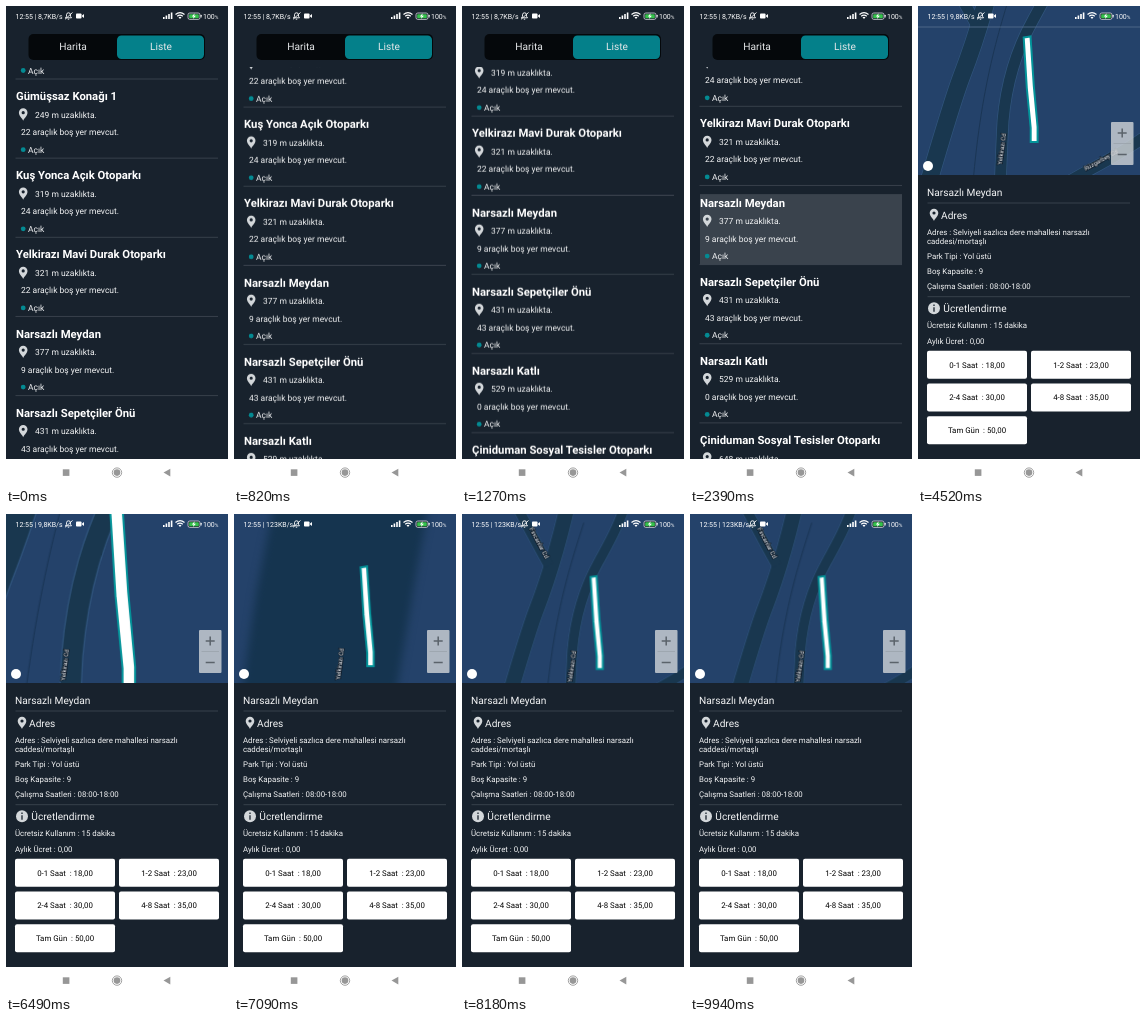
Write an HTML page that moves like this. It is 222 px wide and 480 px high and loops after 10 s.

```html
<!DOCTYPE html>
<html lang="tr">
<head>
<meta charset="utf-8">
<style>
html, body { margin: 0; width: 100%; height: 100%; overflow: hidden; background: #18222d; }
svg { display: block; width: 222px; height: 480px; font-family: Roboto, sans-serif; }
text { white-space: pre; text-rendering: geometricPrecision; }
.anim { animation: 10s linear infinite; }
#rows { animation-name: scroll; }
#list { animation-name: leave; }
#detail { animation-name: enter; }
#press { animation-name: press; }
#coarse { animation-name: coarse; filter: blur(4px); }
#camera { animation-name: camera; }
#roads { animation-name: roads; }
#seam { animation-name: seam; }
#lot { animation-name: lot; }
#labelA { animation-name: labelA; }
#labelB { animation-name: labelB; }
#labelC { animation-name: labelC; }
.net { animation-timing-function: step-end; opacity: 0; }
#net1 { animation-name: net1; }
#net2 { animation-name: net2; }
#net3 { animation-name: net3; }

@keyframes scroll {
  0%, .3% { transform: translateY(0); animation-timing-function: cubic-bezier(.25, .5, .4, 1); }
  4.9%, 8% { transform: translateY(-50px); }
  8.2% { transform: translateY(-51px); animation-timing-function: cubic-bezier(.25, .4, .35, 1); }
  16.1%, 100% { transform: translateY(-131px); }
}
@keyframes press {
  0%, 21.3% { opacity: 0; }
  23.6%, 27% { opacity: 1; }
  29.5%, 100% { opacity: 0; }
}
@keyframes leave {
  0%, 29% { opacity: 1; transform: none; animation-timing-function: ease-in; }
  31.3%, 100% { opacity: 0; transform: translateX(-30px); }
}
@keyframes enter { 0%, 31.5% { opacity: 0; } 33.3%, 100% { opacity: 1; } }
@keyframes net1 { 0% { opacity: 1; } 33% { opacity: 0; } }
@keyframes net2 { 0% { opacity: 0; } 33% { opacity: 1; } 67% { opacity: 0; } }
@keyframes net3 { 0% { opacity: 0; } 67%, 100% { opacity: 1; } }
@keyframes coarse {
  0%, 68% { opacity: 0; }
  70%, 72.5% { opacity: 1; }
  75%, 100% { opacity: 0; }
}
@keyframes roads {
  0%, 35% { opacity: 0; }
  40%, 68% { opacity: 1; }
  70%, 72.5% { opacity: 0; }
  75%, 100% { opacity: 1; }
}
@keyframes camera {
  0%, 45.2% { transform: translate(113px, 83px) scale(1); animation-timing-function: ease-in; }
  51% { transform: translate(114px, 81px) scale(1.55); animation-timing-function: ease-out; }
  57.3% { transform: translate(115.5px, 80px) scale(1.8); }
  63% { transform: translate(116px, 82px) scale(1.9); }
  66.5% { transform: translate(118px, 85px) scale(1.75); }
  70.9% { transform: translate(133.5px, 102px) scale(.945); animation-timing-function: ease-out; }
  76%, 100% { transform: translate(135px, 108.3px) scale(.88); }
}
@keyframes seam { 0%, 40% { opacity: 0; } 42%, 46% { opacity: 1; } 50%, 100% { opacity: 0; } }
@keyframes lot { 0%, 37% { opacity: 0; } 38.5%, 100% { opacity: 1; } }
@keyframes labelA {
  0%, 42.4% { opacity: 0; transform: translate(84px, 143px) rotate(-82deg); }
  43.6%, 45.2% { opacity: 1; transform: translate(84px, 143px) rotate(-82deg); }
  57.3%, 66% { opacity: 1; transform: translate(59px, 151px) rotate(-83deg); }
  70.9% { opacity: 1; transform: translate(106px, 150px) rotate(-83deg); }
  76%, 100% { opacity: 1; transform: translate(110px, 152.5px) rotate(-82deg); }
}
@keyframes labelB {
  0%, 42.4% { opacity: 0; transform: translate(183px, 154px) rotate(-29deg); }
  43.6%, 45.2% { opacity: 1; transform: translate(183px, 154px) rotate(-29deg); }
  49%, 100% { opacity: 0; transform: translate(216px, 183px) rotate(-29deg); }
}
@keyframes labelC { 0%, 74.5% { opacity: 0; } 76%, 100% { opacity: 1; } }
</style>
</head>
<body>
<svg viewBox="0 0 222 480">
  <defs>
    <clipPath id="listClip"><rect y="61" width="222" height="392"/></clipPath>
    <clipPath id="mapClip"><rect width="222" height="169"/></clipPath>
    <path id="pin" fill-rule="evenodd" d="M0 6C-1 3.5-4.3 1-4.3-2A4.3 4.3 0 0 1 4.3-2C4.3 1 1 3.5 0 6ZM-1.6-2a1.6 1.6 0 1 0 3.2 0a1.6 1.6 0 1 0-3.2 0Z"/>
    <path id="avenue" fill="none" d="M86-80C76-30 64 18 43 72C32 102 22 136 -2 220"/>
    <g id="streets" fill="none">
      <path d="M152-70C138-26 128-10 115 14C96 48 88 80 85 115C83 150 82 190 80 240"/>
      <path d="M5-80C26-42 42-10 58 18"/>
      <path d="M110 205C140 178 170 166 200 148S240 122 270 95"/>
    </g>
  </defs>
  <rect width="222" height="480" fill="#18222d"/>

  <g id="list" class="anim">
    <g clip-path="url(#listClip)"><g id="rows" class="anim"></g></g>
    <rect x="22.5" y="28" width="176.5" height="26" rx="5" fill="#05080b"/>
    <rect x="111" y="29.5" width="87" height="23.5" rx="4.5" fill="#04808a"/>
    <g id="tabs"></g>
  </g>

  <g id="detail" class="anim">
    <g clip-path="url(#mapClip)">
      <rect width="222" height="170" fill="#24426a"/>
      <path id="coarse" class="anim" d="M42-20H197L182 60L160 190H6L22 80Z" fill="#15344f"/>
      <g id="camera" class="anim">
        <g transform="translate(-113 -83)">
          <g id="roads" class="anim">
            <path d="M98-30C82 20 62 80 54 190" fill="none" stroke="#1b3655" vector-effect="non-scaling-stroke"/>
            <g stroke="#30547c">
              <use href="#avenue" stroke-width="18.500"/>
              <use href="#streets" stroke-width="12.500"/>
            </g>
            <g stroke="#19374f">
              <use href="#avenue" stroke-width="17"/>
              <use href="#streets" stroke-width="11"/>
            </g>
          </g>
          <path id="seam" class="anim" d="M-10 21H240" stroke="#587190" stroke-width=".8"/>
          <path id="lot" class="anim" d="M105.700 31.500L112.500 30.500L115.800 80L119.600 121V136H112.700V122L108.800 82Z" fill="#fff" stroke="#04949a" stroke-width="2" vector-effect="non-scaling-stroke"/>
        </g>
      </g>
      <g id="labelA" class="anim"></g>
      <g id="labelB" class="anim"></g>
      <g id="labelC" class="anim"></g>
      <circle cx="10" cy="160" r="5" fill="#fff"/>
      <rect x="193" y="116" width="22.5" height="43" rx="1" fill="#d5d9dc" opacity=".78"/>
      <path d="M195.500 137.500H213" stroke="#98a1a9" stroke-width=".7"/>
      <path d="M199.700 127H208.700M204.200 122.500V131.500M199.700 148.500H208.700" stroke="#5b636b" stroke-width="1.5"/>
    </g>
    <g id="info"></g>
  </g>

  <g id="status" fill="#fff">
    <g stroke="#fff" fill="none" stroke-width=".9">
      <path d="M59.500 11.800H65.500L64.500 10.300V8.800A2 2 0 0 0 60.500 8.800V10.300ZM61.800 13.200H63.200M59 13.300L66.500 6.500"/>
      <path d="M169.500 8.500Q174 4.700 178.500 8.500M171.200 10.300Q174 8 176.800 10.300" stroke-width="1.2"/>
    </g>
    <rect x="70" y="7.500" width="5.500" height="5" rx=".8"/>
    <path d="M75.500 10L78 8V12Z"/>
    <path d="M157 11h1.600v2h-1.600ZM159.600 9.500h1.600v3.500h-1.600ZM162.200 8h1.600v5h-1.600ZM164.800 6.500h1.600v6.500h-1.600Z"/>
    <path d="M172.500 11.300Q174 10.200 175.500 11.300L174 13Z"/>
    <rect x="182" y="7" width="12" height="6.400" rx="1.800" fill="#18222d" stroke="#d8dce0" stroke-width=".8"/>
    <rect x="183.200" y="8.200" width="9.600" height="4" rx=".8" fill="#35c24b"/>
    <rect x="194.600" y="8.800" width="1" height="2.600" rx=".5"/>
    <path d="M188.700 7.300L185.800 10.600H187.600L187 13L189.900 9.700H188.100Z"/>
  </g>

  <rect y="453" width="222" height="27" fill="#fff"/>
  <rect x="56.800" y="463.300" width="6.600" height="6.600" fill="#979797"/>
  <circle cx="111" cy="466.600" r="4.700" fill="none" stroke="#979797" stroke-width=".9"/>
  <circle cx="111" cy="466.600" r="3.300" fill="#979797"/>
  <path d="M157.500 466.600L164.300 462.800V470.400Z" fill="#979797"/>
</svg>
<script>
const el = id => document.getElementById(id);
const put = (id, html) => el(id).insertAdjacentHTML('beforeend', html);

// y is the middle of the capitals
const text = (x, y, size, str, attrs = 'fill="#f4f5f6"') =>
  `<text x="${x}" y="${(y + size * .355).toFixed(2)}" font-size="${size}" ${attrs}>${str}</text>`;
const mid = color => `fill="${color}" text-anchor="middle"`;
const rule = y => `<path d="M9.500 ${y}H212" stroke="#414a54" stroke-width=".8"/>`;
const pin = (x, y) => `<use href="#pin" x="${x}" y="${y}" fill="#d3d7da"/>`;

const parks = [
  ['', 0, 0],
  ['Gümüşsaz Konağı 1', 249, 22],
  ['Kuş Yonca Açık Otoparkı', 319, 24],
  ['Yelkirazı Mavi Durak Otoparkı', 321, 22],
  ['Narsazlı Meydan', 377, 9],
  ['Narsazlı Sepetçiler Önü', 431, 43],
  ['Narsazlı Katlı', 529, 0],
  ['Çiniduman Sosyal Tesisler Otoparkı', 648, 12]
];
const TITLE = 11.3, BODY = 8.47, HEAD = 10.17, SMALL = 7.85;

parks.forEach(([name, metres, free], i) => {
  const y = 11 + 79.15 * i;
  const glow = i === 4
    ? `<rect id="press" class="anim" x="10" y="${y - 8.5}" width="202" height="70.500" fill="#3a434d"/>` : '';
  put('rows', glow +
    text(10, y, TITLE, name, 'fill="#fff" font-weight="700"') +
    pin(17.2, y + 18.5) +
    text(29, y + 18.5, BODY, `${metres} m uzaklıkta.`) +
    text(15, y + 36, BODY, `${free} araçlık boş yer mevcut.`) +
    `<circle cx="17.200" cy="${y + 53.5}" r="2.400" fill="#048a92"/>` +
    text(22, y + 53.5, BODY, 'Açık') + rule(y + 62));
});

put('tabs', text(67, 40.5, HEAD, 'Harita', mid('#e6e8ea')) + text(155, 40.5, HEAD, 'Liste', mid('#e6e8ea')));

const facts = [
  [226, 'Adres : Selviyeli sazlıca dere mahallesi narsazlı'],
  [235, 'caddesi/mortaşlı'],
  [250.3, 'Park Tipi : Yol üstü'],
  [265.5, 'Boş Kapasite : 9'],
  [280.7, 'Çalışma Saatleri : 08:00-18:00'],
  [319.5, 'Ücretsiz Kullanım : 15 dakika'],
  [335, 'Aylık Ücret : 0,00']
];
put('info',
  text(9, 186, HEAD, 'Narsazlı Meydan') + rule(197) +
  pin(16, 209) + text(23, 209.3, HEAD, 'Adres') +
  facts.map(([y, str]) => text(9, y, SMALL, str)).join('') + rule(290.7) +
  '<circle cx="16" cy="302.300" r="6" fill="#d3d7da"/><path d="M16 301.300V305.800M16 298.600V300" stroke="#18222d" stroke-width="1.300"/>' +
  text(25.3, 302.3, HEAD, 'Ücretlendirme'));

['0-1 Saat  : 18,00', '1-2 Saat  : 23,00', '2-4 Saat  : 30,00', '4-8 Saat  : 35,00', 'Tam Gün  : 50,00']
  .forEach((str, i) => {
    const x = 9 + 104 * (i % 2), y = 344.8 + 32.7 * (i >> 1);
    put('info', `<rect x="${x}" y="${y}" width="100" height="28" rx="2" fill="#fff"/>` +
      text(x + 50, y + 14, SMALL, str, mid('#000')));
  });

const street = mid('#eef1f4') + ' stroke="#101c2a" stroke-width="1.6" paint-order="stroke"';
put('labelA', text(0, 0, 6.1, 'Yelkirazı Cd', street));
put('labelB', text(0, 0, 6.1, 'Rüzgarbey Cd', street));
put('labelC', `<g transform="translate(77 29) rotate(62)">${text(0, 0, 6.1, 'Fincanlar Cd', street)}</g>`);

['8,7', '9,8', '123'].forEach((rate, i) =>
  put('status', text(9.5, 10.3, 7, `12:55 | ${rate}KB/s`, `id="net${i + 1}" class="anim net"`)));
put('status', text(197, 10.3, 7, '100', '') + text(208.8, 10.8, 5, '%', ''));
</script>
</body>
</html>
```
